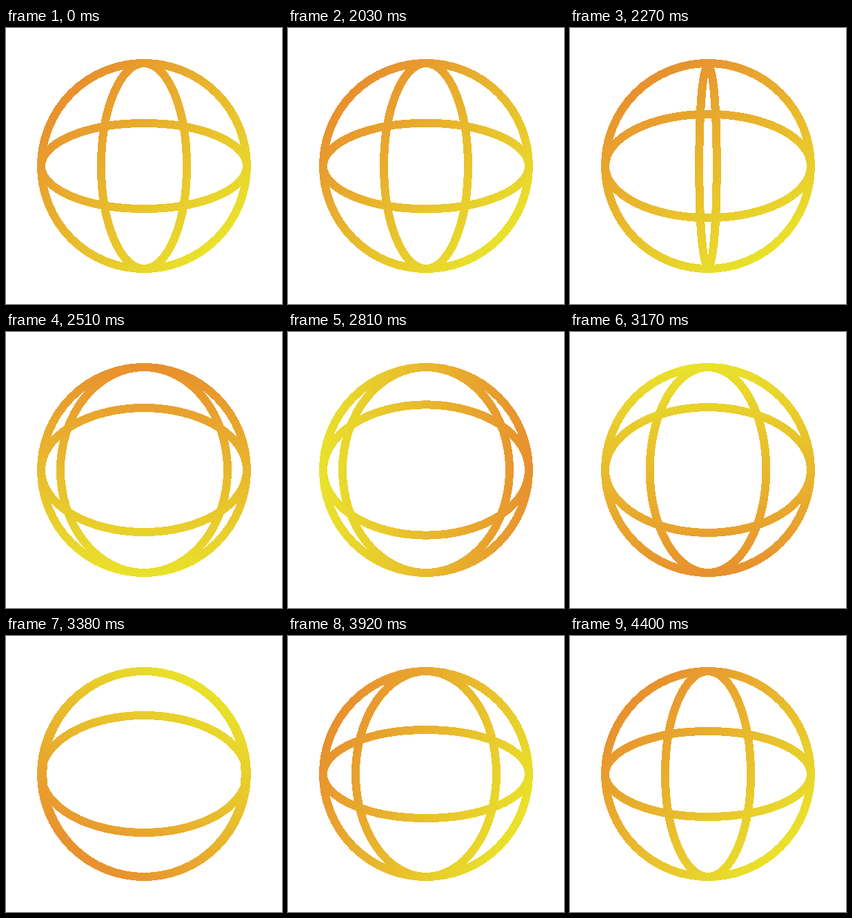
These frames come from a looping animation (400 px wide and 400 px high, 4430 ms). An HTML page:

```html
<!DOCTYPE html>
<html lang="en">
<head>
<meta charset="utf-8">
<title>Spinning globe</title>
<style>
  html, body { margin: 0; width: 100%; height: 100%; overflow: hidden; background: #fff; }
  svg { display: block; width: 100vw; height: 100vh; }
  ellipse { fill: none; stroke: url(#tint); stroke-width: 12; shape-rendering: crispEdges; }
</style>
</head>
<body>
<svg viewBox="0 0 400 400">
  <defs>
    <linearGradient id="tint" gradientUnits="userSpaceOnUse" x1="350" y1="200" x2="50" y2="200">
      <stop offset="0" stop-color="#e8912e"/>
      <stop offset="1" stop-color="#e9e12b"/>
    </linearGradient>
  </defs>
  <ellipse cx="200" cy="200" rx="149" ry="149"/>
  <ellipse id="meridian" cx="200" cy="200" rx="62" ry="149"/>
  <ellipse id="equator" cx="200" cy="200" rx="149" ry="62"/>
</svg>
<script>
  const LOOP = 4430, HOLD = 2000, SPIN = 2400, STEP = 30, R = 149;
  const tint = document.getElementById('tint');
  const meridian = document.getElementById('meridian');
  const equator = document.getElementById('equator');

  const keys = [0, 0.2125, 0.4125, 0.575, 0.8, 1];
  const turn = [24.6, -54.3, -170.6, -260, -316.8, -335.4];
  const tilt = [62, 90, 94, 85, 64, 62];
  const glow = [225, 273, 409, 485, 566, 585];

  // Smooth curve through the keys, at rest at both ends
  function slope(v, i) {
    if (i === 0 || i === keys.length - 1) return 0;
    const a = keys[i] - keys[i - 1], b = keys[i + 1] - keys[i];
    return ((v[i] - v[i - 1]) / a * b + (v[i + 1] - v[i]) / b * a) / (a + b);
  }

  function curve(v, u) {
    let i = 0;
    while (i < keys.length - 2 && u > keys[i + 1]) i++;
    const h = keys[i + 1] - keys[i], s = (u - keys[i]) / h, q = 1 - s;
    return v[i] * q * q * (1 + 2 * s) + v[i + 1] * s * s * (3 - 2 * s)
      + h * s * q * (slope(v, i) * q - slope(v, i + 1) * s);
  }

  function draw(now) {
    const steps = Math.max(0, Math.floor((now % LOOP - HOLD) / STEP));
    const u = Math.min(1, steps * STEP / SPIN);
    meridian.setAttribute('rx', Math.abs(R * Math.sin(curve(turn, u) * Math.PI / 180)));
    equator.setAttribute('ry', curve(tilt, u));
    tint.setAttribute('gradientTransform', `rotate(${curve(glow, u)} 200 200)`);
  }

  const start = performance.now();
  function tick() {
    draw(performance.now() - start);
    requestAnimationFrame(tick);
  }
  tick();
</script>
</body>
</html>
```
